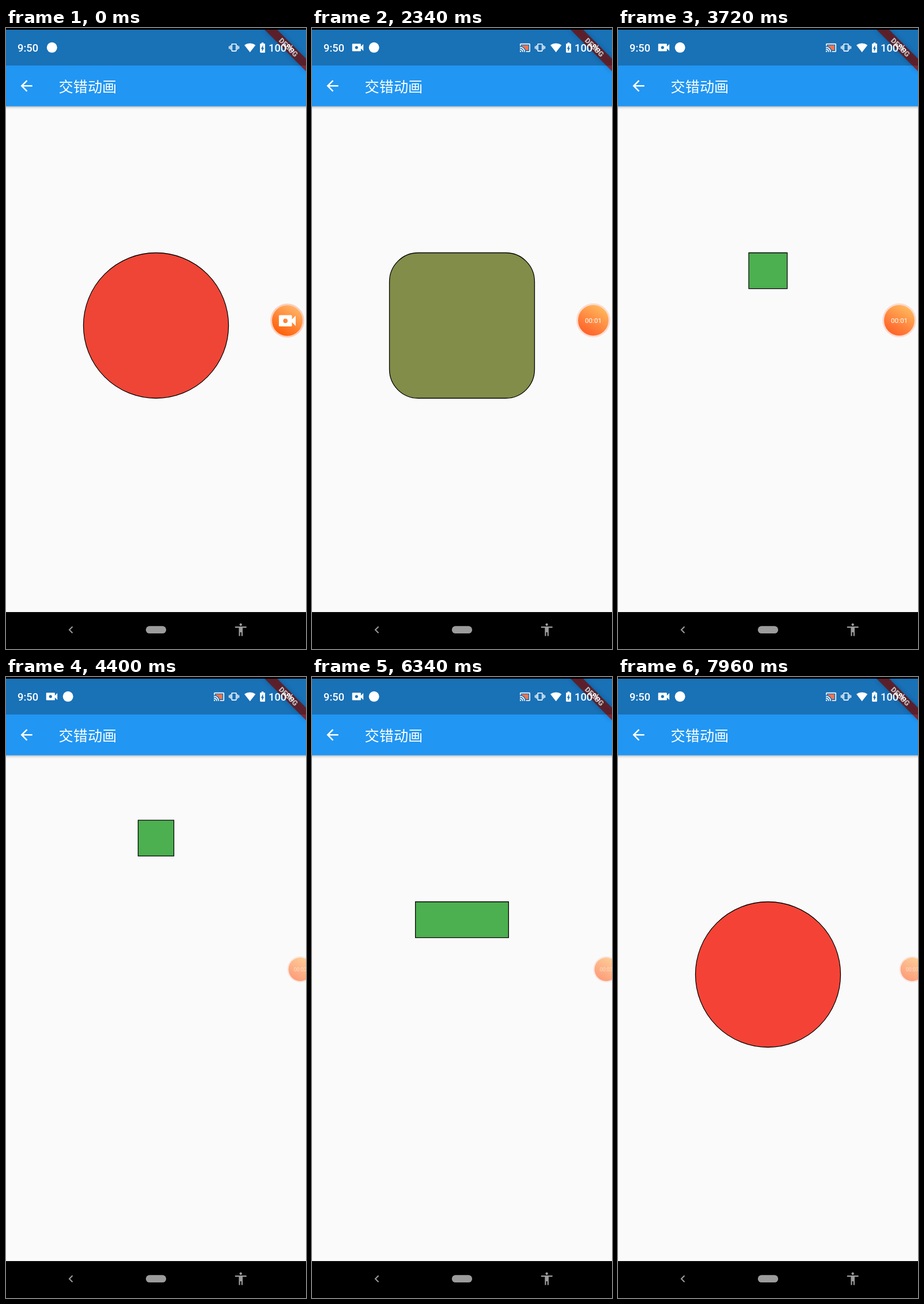
These frames come from a looping animation (521x1076 px, 7.99 s). An HTML page with a canvas:

```html
<!DOCTYPE html>
<html lang="zh-CN">
<head>
<meta charset="utf-8">
<title>交错动画</title>
<style>
html, body { margin: 0; width: 100%; height: 100%; overflow: hidden; background: #000; }
canvas { display: block; width: 521px; height: 1076px; }
</style>
</head>
<body>
<canvas id="stage" width="521" height="1076"></canvas>
<script>
const ctx = document.getElementById('stage').getContext('2d');
const W = 521, H = 1076, LOOP = 7990;
const DP = W / 411.43;
const START = 930, RUN = 4000;      // controller start and one-way duration
const REC_ON = 200, TICK = 2000;
const BODY_TOP = 135.6;

const ICONS = {
  back: 'M20 11H7.83l5.59-5.59L12 4l-8 8 8 8 1.41-1.41L7.83 13H20v-2z',
  video: 'M17 10.5V7c0-.55-.45-1-1-1H4c-.55 0-1 .45-1 1v10c0 .55.45 1 1 1h12c.55 0 1-.45 1-1v-3.5l4 4v-11l-4 4z' +
    'M12.4 12a2.4 2.4 0 1 0-4.8 0a2.4 2.4 0 1 0 4.8 0z',
  cast: 'M1 18v3h3c0-1.66-1.34-3-3-3zm0-4v2c2.76 0 5 2.24 5 5h2c0-3.87-3.13-7-7-7zM1 10v2c4.97 0 9 4.03 9 9h2c0-6.08-4.93-11-11-11z' +
    'm20-7H3c-1.1 0-2 .9-2 2v3h2V5h18v14h-7v2h7c1.1 0 2-.9 2-2V5c0-1.1-.9-2-2-2z',
  castFill: 'M19 7H5v1.63c3.96 1.28 7.09 4.41 8.37 8.37H19V7z',
  vibrate: 'M0 15h2V9H0v6zm3 2h2V7H3v10zm19-8v6h2V9h-2zm-3 8h2V7h-2v10zM16.5 3h-9C6.67 3 6 3.67 6 4.5v15c0 .83.67 1.5 1.5 1.5h9' +
    'c.83 0 1.5-.67 1.5-1.5v-15c0-.83-.67-1.5-1.5-1.5zM16 19H8V5h8v14z',
  wifi: 'M12.01 21.49L23.64 7c-.45-.34-4.93-4-11.64-4C5.28 3 .81 6.66.36 7l11.63 14.49.01.01.01-.01z',
  battery: 'M15.67 4H14V2h-4v2H8.33C7.6 4 7 4.6 7 5.33v15.33C7 21.4 7.6 22 8.33 22h7.33c.74 0 1.34-.6 1.34-1.33V5.33' +
    'C17 4.6 16.4 4 15.67 4zM11 20v-5.5H9L13 7v5.5h2L11 20z',
  access: 'M12 2c1.1 0 2 .9 2 2s-.9 2-2 2-2-.9-2-2 .9-2 2-2zm9 7h-6v13h-2v-6h-2v6H9V9H3V7h18v2z'
};
for (const k in ICONS) ICONS[k] = new Path2D(ICONS[k]);

const clamp = x => Math.min(1, Math.max(0, x));
const mix = (a, b, k) => a + (b - a) * k;
const span = (v, a, b) => clamp((v - a) / (b - a));

function rect(x, y, w, h, fill) {
  ctx.fillStyle = fill;
  ctx.fillRect(x, y, w, h);
}

function disc(x, y, r, fill) {
  ctx.fillStyle = fill;
  ctx.beginPath();
  ctx.arc(x, y, r, 0, Math.PI * 2);
  ctx.fill();
}

// Draws a 24-unit icon centred on (x, y).
function icon(name, x, y, scale, fill = '#fff') {
  ctx.save();
  ctx.translate(x, y);
  ctx.scale(scale, scale);
  ctx.translate(-12, -12);
  ctx.fillStyle = fill;
  ctx.fill(ICONS[name], 'evenodd');
  ctx.restore();
}

function label(str, x, y, font, fill = '#fff', align = 'left') {
  ctx.font = font;
  ctx.textAlign = align;
  ctx.fillStyle = fill;
  ctx.fillText(str, x, y);
}

function drawAppBar() {
  ctx.save();
  ctx.shadowColor = 'rgba(0,0,0,.36)';
  ctx.shadowBlur = 5;
  ctx.shadowOffsetY = 1.6;
  rect(-10, 3, W + 20, BODY_TOP - 3, '#2196f3');
  ctx.restore();
  icon('back', 35.6, 100.3, DP);
  label('交错动画', 91.5, 110.5, '400 25.2px "Noto Sans CJK SC", "Noto Sans CJK", sans-serif');
}

function drawBanner() {
  ctx.save();
  ctx.beginPath();
  ctx.rect(0, 3, W, H);
  ctx.clip();
  ctx.translate(W, 3);
  ctx.rotate(Math.PI / 4);
  ctx.shadowColor = 'rgba(0,0,0,.5)';
  ctx.shadowBlur = 8;
  rect(-40 * DP, 28 * DP, 80 * DP, 12 * DP, 'rgba(0,0,0,.45)');
  ctx.shadowColor = 'transparent';
  rect(-40 * DP, 28 * DP, 80 * DP, 12 * DP, 'rgba(183,28,28,.63)');
  label('DEBUG', 0, 34 * DP + 4.6, '900 12.6px Roboto, sans-serif', '#fff', 'center');
  ctx.restore();
}

function drawStatus(recording) {
  rect(0, 0, W, 3, '#000');
  rect(0, 3, W, 62, 'rgba(0,0,0,.25)');
  const font = '500 18.3px Roboto, sans-serif';
  label('9:50', 20, 40.5, font);
  label('100%', 456, 40.5, font);
  disc(recording ? 107.7 : 79.8, 33.8, 9, '#fff');
  if (recording) {
    icon('video', 79.5, 33.8, 1.08);
    icon('castFill', 370, 34.2, 0.82, '#f4744c');
    icon('cast', 370, 34.2, 0.82);
  }
  icon('vibrate', 396, 33.8, 0.76);
  icon('wifi', 423.7, 34, 0.83);
  icon('battery', 445.5, 34, 0.88);
}

function drawBox(v, recording) {
  const tint = span(v, 0.25, 0.4);
  const h = mix(200, 50, span(v, 0.45, 0.6)) * DP;
  const w = mix(200, 50, span(v, 0.6, 0.7)) * DP;
  const top = BODY_TOP + mix(200, 0, span(v, 0.7, 1)) * DP;
  const x = W / 2 - w / 2;
  const r = Math.min(mix(126, 0, tint) * DP, w / 2, h / 2);
  const red = recording ? [244, 67, 54] : [238, 69, 54];
  const rgb = [76, 175, 80].map((c, i) => Math.round(mix(red[i], c, tint)));
  const inset = DP / 2;
  ctx.beginPath();
  ctx.roundRect(x + inset, top + inset, w - DP, h - DP, Math.max(0, r - inset));
  ctx.fillStyle = `rgb(${rgb})`;
  ctx.fill();
  ctx.lineWidth = DP;
  ctx.strokeStyle = '#000';
  ctx.stroke();
  const alpha = 1 - span(v, 0, 0.16);
  if (alpha > 0) disc(W / 2, top + h / 2, 27, `rgba(255,255,255,${alpha})`);
}

function drawRecorder(t, recording) {
  const k = span(t, 3800, 4150);
  const dock = k * k * (3 - 2 * k);
  const size = mix(1, 0.77, dock);
  ctx.save();
  ctx.globalAlpha = mix(1, 0.56, dock);
  ctx.translate(mix(488.5, 511, dock), recording ? 506.5 : 507);
  ctx.scale(size, size);
  const g = ctx.createLinearGradient(-13, 24, 15, -22);
  g.addColorStop(0, recording ? '#ff6128' : '#ff5d08');
  g.addColorStop(1, recording ? '#ffb75c' : '#ffb266');
  disc(0, 0, 29.5, recording ? '#fbdcd0' : '#fbcfbc');
  disc(0, 0, 26.5, g);
  if (recording) {
    const sec = Math.floor((t - REC_ON) / TICK);
    label('00:0' + sec, 0, 4.3, '400 11.7px Roboto, sans-serif', '#fff', 'center');
  } else {
    icon('video', 0, 0.3, 1.62);
  }
  ctx.restore();
}

function drawNav() {
  const grey = '#9c9c9c';
  rect(0, 1012, W, 64, '#000');
  ctx.strokeStyle = grey;
  ctx.lineWidth = 2;
  ctx.beginPath();
  ctx.moveTo(115.5, 1037.3);
  ctx.lineTo(110, 1042.8);
  ctx.lineTo(115.5, 1048.3);
  ctx.stroke();
  ctx.fillStyle = grey;
  ctx.beginPath();
  ctx.roundRect(242.8, 1036.3, 35.4, 12.8, 6.4);
  ctx.fill();
  icon('access', 407.7, 1042.5, 1.1, grey);
}

function draw(t) {
  const c = (t - START + 2 * RUN) % (2 * RUN) / RUN;
  const v = c < 1 ? c : 2 - c;
  const recording = t >= REC_ON;
  rect(0, 0, W, H, '#fafafa');
  drawBox(v, recording);
  drawAppBar();
  drawBanner();
  drawStatus(recording);
  drawNav();
  drawRecorder(t, recording);
}

let begin;
function frame(now) {
  begin ??= now;
  draw((now - begin) % LOOP);
  requestAnimationFrame(frame);
}
draw(0);
requestAnimationFrame(frame);
</script>
</body>
</html>
```
